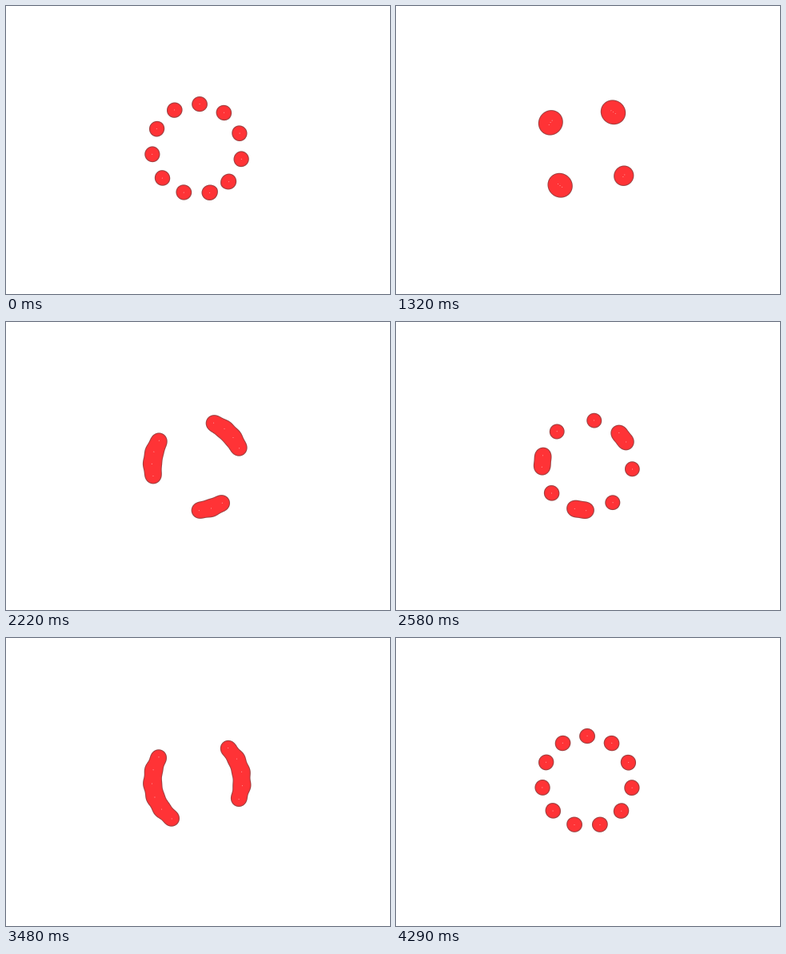
These frames come from a looping animation (480 by 360 pixels, 4.32 s). An HTML page with a canvas:

```html
<!DOCTYPE html>
<html lang="en">
<head>
<meta charset="utf-8">
<title>Orbiting drops</title>
<style>
  html, body { margin: 0; width: 100%; height: 100%; overflow: hidden; background: #fff; }
  canvas { display: block; width: 480px; height: 360px; }
</style>
</head>
<body>
<canvas id="stage" width="480" height="360"></canvas>
<script>
const LOOP = 4320, STEP = 30;
const DROPS = 11, RADIUS = 56.7, CX = 239, CY = 179;
const START = 130.9;      // resting angle, clockwise from the top
const STRENGTH = 72;      // squared radius of a lone drop
const BOX = { x: 154, y: 94, size: 170 };
const FILL = [255, 51, 54], EDGE = [125, 62, 62];

// [time ms, angle between successive drops, speed in degrees per second]
const KEYS = [
  [0, 33.17, 13],
  [690, 53.8, 50],
  [1320, 89.18, 53],
  [1800, 110.63, 38],
  [2580, 136.83, 33],
  [3480, 171.2, 39],
  [4290, 196.38, 13],
  [4320, 196.77, 13]
];

const ctx = document.getElementById('stage').getContext('2d');
const image = ctx.createImageData(BOX.size, BOX.size);
const clamp = v => Math.max(0, Math.min(1, v));

// Cubic Hermite curve through the keys
function spacing(t) {
  let i = 0;
  while (i < KEYS.length - 2 && t >= KEYS[i + 1][0]) i++;
  const [t0, a, va] = KEYS[i], [t1, b, vb] = KEYS[i + 1];
  const d = t1 - t0, u = (t - t0) / d, w = 1 - u;
  return a * (1 + 2 * u) * w * w + b * u * u * (3 - 2 * u)
    + (va * u * w * w - vb * u * u * w) * d / 1000;
}

function dropsAt(t) {
  const gap = spacing(t);
  return Array.from({ length: DROPS }, (_, i) => {
    const a = (START + (i + 1) * gap) * Math.PI / 180;
    return [CX + RADIUS * Math.sin(a), CY - RADIUS * Math.cos(a)];
  });
}

// Metaballs: the drops' inverse-square fields add up, the shape is where the sum exceeds 1
function draw(t) {
  const drops = dropsAt(t), px = image.data;
  let o = 0;
  for (let row = 0; row < BOX.size; row++) {
    for (let col = 0; col < BOX.size; col++, o += 4) {
      const x = BOX.x + col + 0.5, y = BOX.y + row + 0.5;
      let field = 0, gx = 0, gy = 0;
      for (const [cx, cy] of drops) {
        const dx = x - cx, dy = y - cy, q = 1 / (dx * dx + dy * dy + 0.01);
        const f = STRENGTH * q;
        field += f;
        gx -= 2 * f * q * dx;
        gy -= 2 * f * q * dy;
      }
      // Approximate distance in pixels inside the outline
      const inside = (field - 1) / (Math.hypot(gx, gy) + 0.004);
      const cover = clamp(inside + 0.5);
      const rim = field > 2 ? 0 : clamp(1.3 - inside) * 0.85;
      for (let c = 0; c < 3; c++) {
        const ink = FILL[c] + (EDGE[c] - FILL[c]) * rim;
        px[o + c] = 255 + (ink - 255) * cover;
      }
      px[o + 3] = 255;
    }
  }
  ctx.putImageData(image, BOX.x, BOX.y);
}

const begin = performance.now();
let shown = -1;
function tick() {
  const t = Math.floor(((performance.now() - begin) % LOOP) / STEP) * STEP;
  if (t !== shown) draw(shown = t);
  requestAnimationFrame(tick);
}
tick();
</script>
</body>
</html>
```
